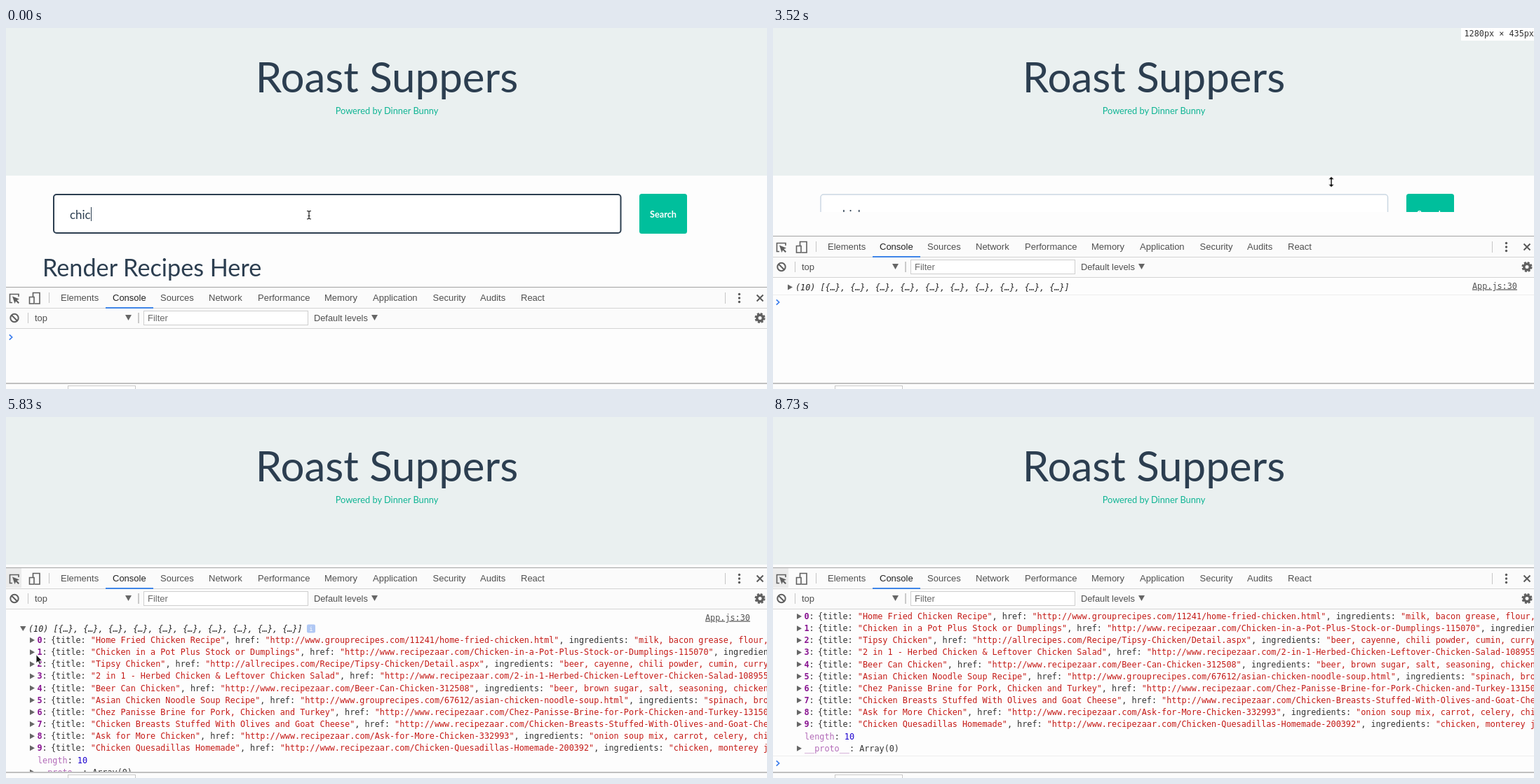
Recreate the animation shown at these times as an HTML page. Size 1085 by 516 pixels, loop 8830 ms.

```html
<!DOCTYPE html>
<html lang="en">
<head>
<meta charset="utf-8">
<title>Recipe search</title>
<style>
  html, body { margin: 0; width: 100%; height: 100%; overflow: hidden; background: #fdfdfd; }
  svg { display: block; width: 1085px; height: 516px; }
  text { white-space: pre; }
  .lato { font-family: Lato, sans-serif; fill: #2c3e50; }
  .ui { font: 13px "Liberation Sans", Arial, sans-serif; fill: #4f4f4f; }
  .mono { font: 11.8px "DejaVu Sans Mono", monospace; fill: #333; }
  .italic { font-style: italic; fill: #222; }
  .str { fill: #c41a16; }
  .index { fill: #881391; font-weight: bold; }
  .dim { fill: #b26ab8; }
  .num { fill: #1c00cf; }
  .icon { fill: none; stroke: #5f5f5f; stroke-width: 1.6; }
  .tri { fill: #666; }
  .prompt { fill: none; stroke: #3b7ded; stroke-width: 1.7; }
</style>
</head>
<body>
<svg viewBox="0 0 1085 516">
  <defs>
    <clipPath id="pageClip"><rect id="pageBox" width="1085" height="371"/></clipPath>
    <clipPath id="logClip"><rect id="logBox" y="59" width="1085" height="77"/></clipPath>
  </defs>

  <g clip-path="url(#pageClip)">
    <rect width="1085" height="211" fill="#eaf0f0"/>
    <text class="lato" x="543" y="91.5" font-size="60" text-anchor="middle">Roast Suppers</text>
    <text class="lato" x="543" y="123" font-size="12.8" text-anchor="middle" style="fill:#10b594">Powered by Dinner Bunny</text>
    <rect id="field" x="68" y="238" width="808.5" height="55" rx="4" fill="#fff"/>
    <text class="lato" id="query" x="91" y="272.5" font-size="16.95"></text>
    <rect id="queryCaret" y="256" width="1" height="20" fill="#2c3e50"/>
    <rect x="903" y="237" width="68" height="57" rx="3.5" fill="#00bf9c"/>
    <text class="lato" x="937" y="271" font-size="12.7" font-weight="bold" text-anchor="middle" style="fill:#fff">Search</text>
    <text class="lato" x="52" y="355" font-size="34.2">Render Recipes Here</text>
  </g>

  <g id="sizeLabel">
    <rect x="981" width="104" height="18" fill="#fff"/>
    <text class="mono" id="sizeText" x="985.5" y="12"></text>
  </g>

  <g id="panel">
    <rect y="-1" width="1085" height="400" fill="#fdfdfd"/>
    <rect width="1085" height="58" fill="#fbfbfb"/>
    <rect id="inspectHover" width="22" height="28" fill="#ebebeb"/>
    <rect y="-1" width="1085" height="1" fill="#a3a3a3"/>
    <path d="M0 29.5H1085M0 58.5H1085" stroke="#d4d4d4"/>
    <rect x="142" y="28" width="68" height="2" fill="#3f85e8"/>
    <path d="M61.5 7V22M31.5 36V51M1025.5 7V23" stroke="#c6c6c6"/>
    <path d="M189 36V51" stroke="#999"/>
    <path class="icon" d="M18 13V9.5H5.5V21.5H9"/>
    <path d="M9 12.5L19 16.5L15.5 18L19 21.5L17.5 23L14 19.5L12.5 23Z" fill="#5f5f5f"/>
    <path class="icon" d="M38.5 13V7.5H48V23H41M33.5 13.5H40V23H33.5Z"/>
    <g fill="#5a5a5a">
      <circle cx="1045.5" cy="9.5" r="1.7"/><circle cx="1045.5" cy="15" r="1.7"/><circle cx="1045.5" cy="20.5" r="1.7"/>
    </g>
    <path d="M1070.5 10.5L1079.5 19.5M1079.5 10.5L1070.5 19.5" stroke="#5a5a5a" stroke-width="2"/>
    <circle class="icon" cx="12" cy="43.5" r="5.7" style="stroke-width:2"/>
    <path class="icon" d="M8 39.5L16 47.5" style="stroke-width:2"/>
    <rect x="196.5" y="33.5" width="234" height="20" fill="#fff" stroke="#cfcfcf"/>
    <path class="tri" d="M170 39h9l-4.5 8zM521 39h9l-4.5 8z"/>
    <circle cx="1075" cy="43.5" r="6.3" fill="none" stroke="#5f5f5f" stroke-width="2.5" stroke-dasharray="2.9 2.05"/>
    <circle cx="1075" cy="43.5" r="4.2" fill="none" stroke="#5f5f5f" stroke-width="3.4"/>
    <g class="ui">
      <g id="tabs"></g>
      <text x="41" y="48">top</text>
      <text x="202" y="48" fill-opacity=".85">Filter</text>
      <text x="439" y="48" font-size="12.8">Default levels</text>
    </g>
    <g clip-path="url(#logClip)">
      <g id="log">
        <g id="entry">
          <text class="mono" x="997" y="74.5" text-decoration="underline" style="fill:#555">App.js:30</text>
          <g id="summary">
            <path class="tri" id="closedTri" d="M21 68.5v8l7-4z"/>
            <path class="tri" id="openTri" d="M20 69h8.5l-4.2 7z"/>
            <text class="mono italic" id="summaryText" x="32" y="76.5"></text>
            <g id="badge">
              <rect x="429" y="66.5" width="12" height="12" rx="2" fill="#b0c8f4"/>
              <text class="mono" x="435" y="76" text-anchor="middle" style="fill:#fff;font-size:9px">i</text>
            </g>
          </g>
          <g id="rows"></g>
        </g>
        <g id="promptLine">
          <path id="rule" d="M0 -10.5H1085" stroke="#ededed"/>
          <path class="prompt" d="M4.8 -3.7L8.7 0L4.8 3.7"/>
          <rect id="logCaret" x="19.5" y="-7" width="1.3" height="14" fill="#111"/>
        </g>
      </g>
    </g>
  </g>

  <rect id="scrollbar" x="1083.5" y="300" width="1.5" height="190" fill="#888"/>
  <rect y="507" width="1085" height="9" fill="#fcfcfc"/>
  <path d="M0 508H1085" stroke="#adadad" stroke-width="1.4"/>
  <rect x="88.5" y="511.5" width="96" height="10" fill="#fff" stroke="#c8c8c8"/>

  <g id="cursor" stroke-linejoin="round">
    <path id="ibeam" d="M-3 -5.5Q0 -5.5 0 -4V4.5Q0 6 -3 6M3 -5.5Q0 -5.5 0 -4M0 4.5Q0 6 3 6M-1.5 1.5H1.5" fill="none" stroke="#222" stroke-width="1.2"/>
    <path id="hand" d="M-3.5 -6.5Q-2 -8.5 -.7 -6.5V-2Q1.2 -3 1.9 -1.3Q3.7 -2 4.2 -.4Q6 -.7 6 1.2V4L4.7 8H-2L-6 2.5Q-5.5 .3 -3.5 2Z" fill="#fff" stroke="#111" stroke-width="1.3"/>
    <path id="resize" d="M-4 -3.5L0 -7.5L4 -3.5H1V3.5H4L0 7.5L-4 3.5H-1V-3.5Z" fill="#111" stroke="#fff" stroke-width=".6"/>
    <path id="arrow" d="M0 0V12.5L2.8 9.8L4.8 14.5L6.9 13.6L4.9 9H8.6Z" fill="#111" stroke="#fff" stroke-width=".9"/>
  </g>
</svg>

<script>
const LOOP = 8830, CONSOLE_END = 507, TOOLBARS = 59;
const ui = {};
document.querySelectorAll('[id]').forEach(el => ui[el.id] = el);

const show = (el, on) => el.style.display = on ? '' : 'none';
const move = (el, x, y) => el.setAttribute('transform', `translate(${x} ${y})`);
const escapeText = s => String(s).replace(/&/g, '&amp;');

const tabX = { Elements: 78, Console: 152, Sources: 220, Network: 289, Performance: 359,
  Memory: 454, Application: 523, Security: 608.5, Audits: 676, React: 734 };
ui.tabs.innerHTML = Object.entries(tabX).map(([name, x]) =>
  `<text x="${x}" y="19"${name === 'Console' ? ' style="fill:#222"' : ''}>${name}</text>`).join('');

ui.summaryText.textContent = `(10) [${Array(10).fill('{…}').join(', ')}]`;

const zaar = 'www.recipezaar.com/', group = 'www.grouprecipes.com/';
const recipes = [
  ['Home Fried Chicken Recipe', group + '11241/home-fried-chicken.html', 'milk, bacon grease, flour, salt'],
  ['Chicken in a Pot Plus Stock or Dumplings', zaar + 'Chicken-in-a-Pot-Plus-Stock-or-Dumplings-115070', 'chicken'],
  ['Tipsy Chicken', 'allrecipes.com/Recipe/Tipsy-Chicken/Detail.aspx', 'beer, cayenne, chili powder, cumin, curry powder'],
  ['2 in 1 - Herbed Chicken & Leftover Chicken Salad', zaar + '2-in-1-Herbed-Chicken-Leftover-Chicken-Salad-108955', 'chicken'],
  ['Beer Can Chicken', zaar + 'Beer-Can-Chicken-312508', 'beer, brown sugar, salt, seasoning, chicken'],
  ['Asian Chicken Noodle Soup Recipe', group + '67612/asian-chicken-noodle-soup.html', 'spinach, broccoli'],
  ['Chez Panisse Brine for Pork, Chicken and Turkey', zaar + 'Chez-Panisse-Brine-for-Pork-Chicken-and-Turkey-13150', 'salt'],
  ['Chicken Breasts Stuffed With Olives and Goat Cheese', zaar + 'Chicken-Breasts-Stuffed-With-Olives-and-Goat-Cheese', 'olives'],
  ['Ask for More Chicken', zaar + 'Ask-for-More-Chicken-332993', 'onion soup mix, carrot, celery, chicken'],
  ['Chicken Quesadillas Homemade', zaar + 'Chicken-Quesadillas-Homemade-200392', 'chicken, monterey jack']
];
const rowY = i => 103 + i * 17.15;
const span = (cls, s) => `<tspan class="${cls}">${escapeText(s)}</tspan>`;
const quoted = s => span('str', `"${s}"`);
const rowTri = i => `<path class="tri" d="M34 ${rowY(i) - 4}v8l7-4z"/>`;
const rowText = (i, x, body) => `<text class="mono" x="${x}" y="${rowY(i) + 4}">${body}</text>`;
ui.rows.innerHTML = recipes.map(([title, url, food], i) =>
  rowTri(i) + rowText(i, 44.5, span('index', i) + ':') +
  rowText(i, 64, `{title: ${quoted(title)}, href: ${quoted('http://' + url)}, ingredients: ${quoted(food)}`)
).join('') +
  rowText(10, 45, span('dim', 'length') + ': ' + span('num', 10)) +
  rowTri(11) + rowText(11, 45, span('dim', '__proto__') + ': Array(0)');

// Hard changes: the value of the last key at or before t.
const step = (keys, t) => keys.filter(k => k[0] <= t).pop()[1];

const queryKeys = [[0, 'chic'], [300, 'chick'], [500, 'chicke'], [710, 'chicken']];
const queryCaretKeys = [[0, 1], [1190, 0], [1650, 1], [2160, 0]];
const topKeys = [[0, 371], [3270, 369], [3390, 345], [3520, 298], [3700, 218], [3910, 216]];
const scrollKeys = [[0, 0], [6420, 6], [6530, 34]];
const cursorKinds = [[0, 'ibeam'], [1900, 'arrow'], [2290, 'hand'], [2670, 'resize'], [4350, 'arrow'], [7690, '']];

// Pointer path: time, x, y.
const route = [[0, 432, 267], [1520, 440, 270], [2290, 740, 382], [2550, 742, 381], [2920, 796, 371],
  [3270, 796, 350], [3440, 796, 220], [3700, 796, 217], [4350, 770, 218], [5020, 12, 236], [5160, 21, 285],
  [5560, 24, 291], [6060, 62, 388], [6860, 62, 388], [7155, 560, 244], [7450, 937, 474]];

// Bursts of pointer movement: start, end, number of pictures.
const bursts = [[1520, 2550, 9], [2670, 3700, 9], [4350, 5300, 8], [5560, 6060, 5], [6420, 7450, 8]];

function heldTime(t) {
  const burst = bursts.filter(b => b[0] <= t).pop();
  if (!burst) return 0;
  const [start, end, count] = burst, gap = (end - start) / (count - 1);
  return start + Math.min(count - 1, Math.floor((t - start) / gap)) * gap;
}

function pointerAt(t) {
  const next = route.findIndex(k => k[0] > t);
  if (next < 0) return route[route.length - 1].slice(1);
  const [t0, x0, y0] = route[next - 1], [t1, x1, y1] = route[next];
  const f = (t - t0) / (t1 - t0);
  return [x0 + (x1 - x0) * f, y0 + (y1 - y0) * f];
}

function drawPage(t, panelTop) {
  const focused = t < 3270, lagging = t >= 3520 && t < 3700;
  ui.query.textContent = step(queryKeys, t);
  ui.queryCaret.setAttribute('x', Math.round(91 + ui.query.getComputedTextLength()));
  show(ui.queryCaret, step(queryCaretKeys, t));
  ui.field.setAttribute('stroke', focused ? '#2c3e50' : '#cbd8e3');
  ui.field.setAttribute('stroke-width', focused ? 2 : 1.5);
  ui.pageBox.setAttribute('height', lagging ? 263 : panelTop);
  show(ui.sizeLabel, t >= 3270 && t < 4080);
  ui.sizeText.textContent = `1280px × ${t < 3700 ? 435 : 255}px`;
}

function drawPanel(t, panelTop) {
  const logged = t >= 2030, clicked = t >= 5180, expanded = t >= 5300;
  move(ui.panel, 0, panelTop);
  show(ui.inspectHover, t >= 5020);
  ui.logBox.setAttribute('height', CONSOLE_END - panelTop - TOOLBARS);
  move(ui.log, 0, -step(scrollKeys, t));
  show(ui.entry, logged);
  show(ui.rule, logged);
  show(ui.rows, expanded);
  show(ui.badge, clicked);
  show(ui.openTri, clicked);
  show(ui.closedTri, !clicked);
  ui.openTri.style.opacity = expanded ? 1 : .6;
  move(ui.summary, 0, expanded ? 14 : 0);
  move(ui.promptLine, 0, expanded ? 313 : logged ? 94 : 71);
  show(ui.logCaret, clicked && (!expanded || (t - 310) % 1000 < 420));
  show(ui.scrollbar, t >= 6530 && t < 7300);
}

function drawCursor(t) {
  const kind = step(cursorKinds, t);
  for (const name of ['ibeam', 'hand', 'resize', 'arrow']) show(ui[name], name === kind);
  move(ui.cursor, ...pointerAt(heldTime(t)));
}

function draw(now) {
  const t = Math.max(0, now) % LOOP, panelTop = step(topKeys, t);
  drawPage(t, panelTop);
  drawPanel(t, panelTop);
  drawCursor(t);
  requestAnimationFrame(draw);
}
requestAnimationFrame(draw);
</script>
</body>
</html>
```
